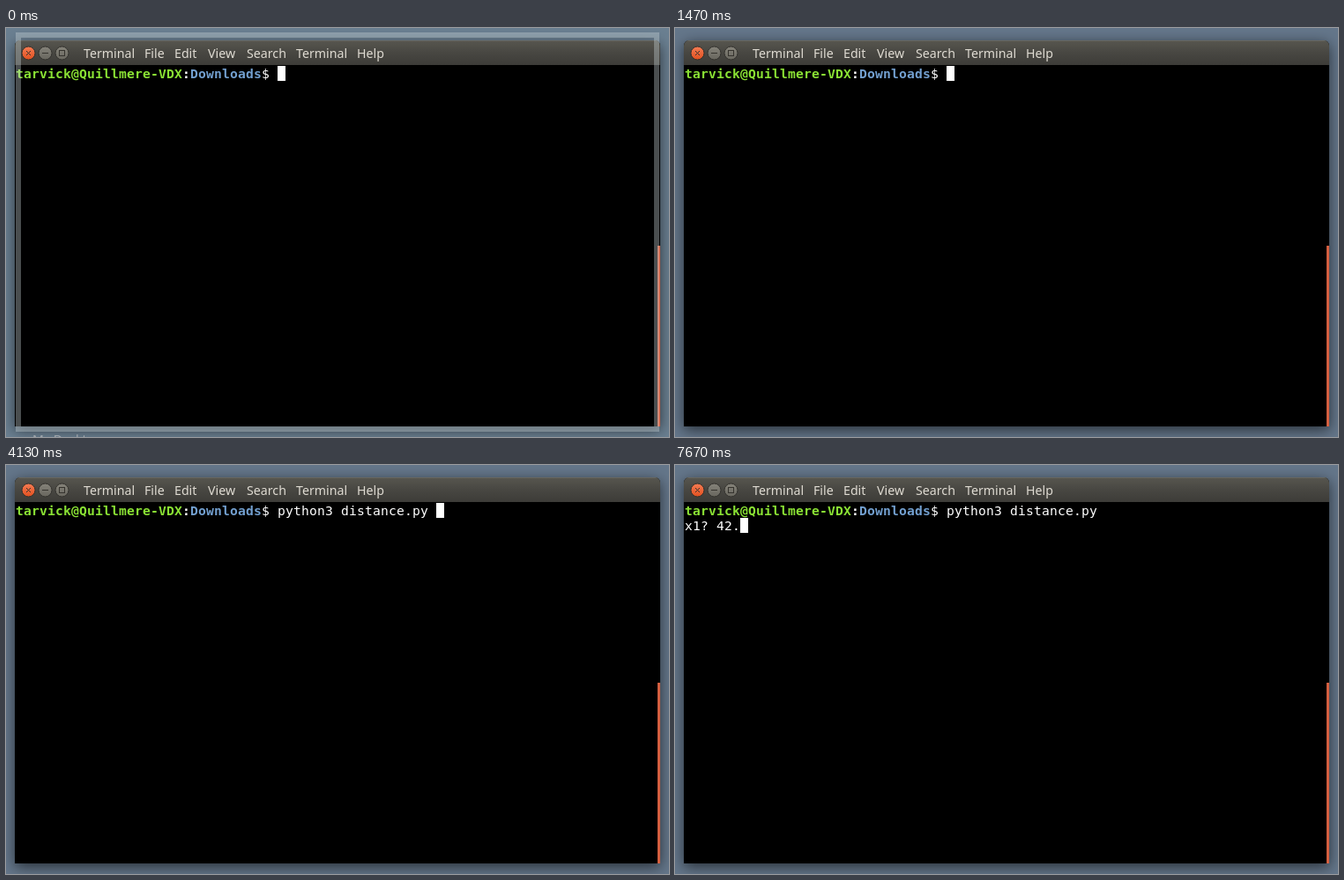
These frames come from a looping animation (752x464 px, 8000 ms). An HTML page with a canvas:

```html
<!DOCTYPE html>
<html lang="en">
<head>
<meta charset="utf-8">
<title>Terminal session</title>
<style>
  html, body { margin: 0; width: 100%; height: 100%; overflow: hidden; background: #64768a; }
  canvas { display: block; }
</style>
</head>
<body>
<canvas id="stage" width="752" height="464"></canvas>
<script>
const ctx = document.getElementById('stage').getContext('2d');
const LOOP = 8000;
const CELL = 9, ROW = 17, LEFT = 11, TOP = 43;
const MONO = '14.67px "DejaVu Sans Mono", monospace';
const SANS = '14.2px "Noto Sans", "Open Sans", sans-serif';
const INK = '#fff';
const HOST = 'tarvick@Quillmere-VDX';
const PROMPT_LENGTH = 33;
const RUN = 'python3 distance.py';

const MENU = [['Terminal', 88], ['File', 157], ['Edit', 191], ['View', 229],
              ['Search', 273], ['Terminal', 329], ['Help', 398]];

// [time, command, reply, cursor visible]; a null reply keeps the cursor on the first row
const STATES = [
  [0, '', null, 1], [700, '', null, 0], [1400, '', null, 1],
  [2200, '', null, 0], [2260, 'p', null, 1], [2400, 'py', null, 1],
  [2465, 'pyt', null, 1], [2530, 'pyth', null, 1], [2600, 'pytho', null, 1],
  [2800, 'python', null, 1], [3400, 'python', null, 0],
  [3465, 'python3', null, 1], [3530, 'python3 ', null, 1],
  [3730, 'python3 d', null, 1], [3800, 'python3 di', null, 1],
  [3930, 'python3 dis', null, 1], [4065, RUN + ' ', null, 1],
  [4530, RUN, '', 1], [4600, RUN, 'x1? ', 1],
  [5265, RUN, 'x1? ', 0], [6000, RUN, 'x1? ', 1],
  [6330, RUN, 'x1? 4', 1], [6665, RUN, 'x1? 42', 1],
  [7400, RUN, 'x1? 42', 0], [7530, RUN, 'x1? 42.', 1]
];

function rect(x, y, w, h, color) {
  ctx.fillStyle = color;
  ctx.fillRect(x, y, w, h);
}

function gradient(y0, y1, ...colors) {
  const g = ctx.createLinearGradient(0, y0, 0, y1);
  colors.forEach((c, i) => g.addColorStop(i / (colors.length - 1), c));
  return g;
}

function line(...points) {
  ctx.beginPath();
  points.forEach(([x, y]) => ctx.lineTo(x, y));
  ctx.stroke();
}

function cells(text, col, row, color, bold) {
  ctx.font = (bold ? 'bold ' : '') + MONO;
  ctx.fillStyle = color;
  [...text].forEach((ch, i) => ctx.fillText(ch, LEFT + (col + i) * CELL, TOP + row * ROW + 14));
}

function windowPath() {
  ctx.beginPath();
  ctx.roundRect(10, 14, 732, 438, [6, 6, 0, 0]);
}

function drawDesktop(fade) {
  rect(0, 0, 752, 464, '#64768a');
  if (fade > 0) {
    ctx.globalAlpha = fade;
    rect(0, 0, 752, 464, 'rgba(125,150,165,.25)');
    ctx.font = SANS;
    ctx.fillStyle = '#b4bcc2';
    ctx.fillText('My Desktop', 30, 472);
    ctx.globalAlpha = 1;
  }
  ctx.save();
  ctx.shadowColor = 'rgba(0,0,0,.6)';
  ctx.shadowBlur = 16;
  ctx.shadowOffsetY = 4;
  ctx.fillStyle = '#000';
  windowPath();
  ctx.fill();
  ctx.restore();
}

function button(x, fill, edge) {
  ctx.beginPath();
  ctx.arc(x, 28.5, 7.5, 0, Math.PI * 2);
  ctx.fillStyle = fill;
  ctx.fill();
  ctx.lineWidth = 1;
  ctx.strokeStyle = edge;
  ctx.stroke();
}

function drawWindow() {
  ctx.save();
  windowPath();
  ctx.clip();
  rect(10, 14, 732, 28, gradient(14, 42, '#57564f', '#484742', '#3d3c38'));
  rect(10, 14, 732, 1, '#67665f');
  rect(10, 42, 732, 410, '#000');
  ctx.restore();

  button(25.5, gradient(21, 36, '#f47c54', '#e2501f'), '#33302b');
  const grey = gradient(21, 36, '#85837a', '#68665e');
  button(44.5, grey, '#33322e');
  button(63.5, grey, '#33322e');
  ctx.strokeStyle = '#35332e';
  line([23, 26], [28, 31]);
  line([28, 26], [23, 31]);
  line([41, 28.5], [48, 28.5]);
  ctx.strokeRect(60.5, 25.5, 6, 6);

  ctx.font = SANS;
  ctx.fillStyle = '#dfdbd2';
  MENU.forEach(([label, x]) => ctx.fillText(label, x, 34));
  rect(739, 247, 3, 205, '#d45f40');
}

function drawSession(t) {
  const [, command, reply, on] = STATES.findLast(s => s[0] <= t);
  cells(HOST, 0, 0, '#8ae234', true);
  cells(':', 21, 0, INK, true);
  cells('Downloads', 22, 0, '#729fcf', true);
  cells('$', 31, 0, INK);
  cells(command, PROMPT_LENGTH, 0, INK);
  let col = PROMPT_LENGTH + command.length, row = 0;
  if (reply !== null) {
    cells(reply, 0, 1, INK);
    col = reply.length;
    row = 1;
  }
  if (on) rect(LEFT + col * CELL, TOP + row * ROW, CELL, ROW, '#fff');
}

function drawPointer() {
  ctx.lineWidth = 1;
  ctx.strokeStyle = '#e8e8e8';
  line([348.5, 146], [348.5, 159]);
  line([346, 145.5], [351, 145.5]);
  line([346, 158.5], [351, 158.5]);
}

function drawOutline(fade) {
  ctx.lineWidth = 6;
  ctx.strokeStyle = `rgba(205,215,220,${0.36 * fade})`;
  ctx.strokeRect(14, 8, 724, 447);
}

function draw(t) {
  const step = Math.floor((t - 130) / 66.7) + 1;
  const fade = Math.max(0, Math.min(1, 1 - step / 9)) ** 2;
  drawDesktop(fade);
  drawWindow();
  drawSession(t);
  if (t >= 400 && t < 1400) drawPointer();
  if (fade > 0) drawOutline(fade);
}

const start = performance.now();
function tick() {
  draw((performance.now() - start) % LOOP);
  requestAnimationFrame(tick);
}
tick();
</script>
</body>
</html>
```
